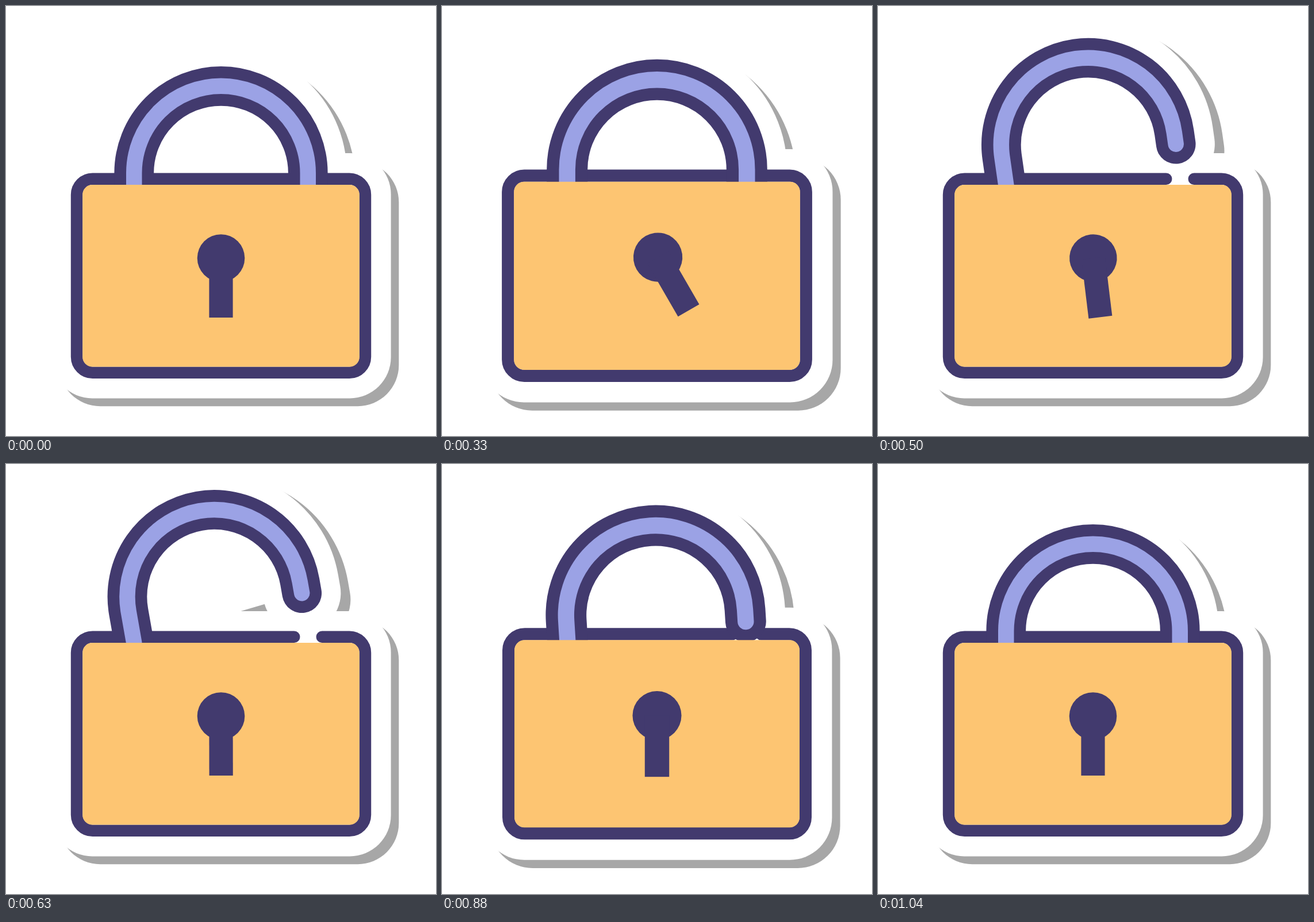
An HTML page for the animation above (1.18 s loop, 748x748 px).

```html
<!DOCTYPE html>
<html lang="en">
<head>
<meta charset="utf-8">
<title>Padlock</title>
<style>
  html, body { margin: 0; width: 100%; height: 100%; overflow: hidden; background: #fff; }
  svg { display: block; width: 100vw; height: 100vh; }
  .line { fill: none; stroke: #423a6e; stroke-linecap: round; }
</style>
</head>
<body>
<svg viewBox="0 0 748 748">
  <defs>
    <path id="bow" d="M222.75 345V290.5a151.25 151.25 0 0 1 302.5 0V311"/>
    <rect id="plate" x="78.4" y="256.1" width="591.2" height="426.3" rx="71.6"/>
  </defs>
  <g id="lock">
    <g class="bow" fill="#a7a7a7" stroke="#a7a7a7" stroke-linecap="round">
      <use href="#bow" x="13.75" y="13.75" stroke-width="137.5"/>
    </g>
    <use href="#plate" x="13.75" y="13.75" fill="#a7a7a7"/>
    <use href="#plate" fill="#fff"/>
    <g class="bow" fill="#fff" stroke="#fff" stroke-linecap="round">
      <use href="#bow" stroke-width="135.3"/>
    </g>
    <path class="line" stroke-width="20.6" d="M549.8 300.8H597.4a27.5 27.5 0 0 1 27.5 27.5V610.2a27.5 27.5 0 0 1-27.5 27.5H150.6a27.5 27.5 0 0 1-27.5-27.5V328.3a27.5 27.5 0 0 1 27.5-27.5H501.2"/>
    <g class="bow">
      <use href="#bow" class="line" stroke-width="68.75"/>
      <use href="#bow" class="line" stroke-width="27.5" style="stroke:#9ba2e5"/>
    </g>
    <rect x="133.2" y="311" width="481.6" height="316.6" rx="17" fill="#fdc572"/>
    <g id="keyhole" fill="#423a6e">
      <circle cx="374" cy="438.5" r="41.3"/>
      <rect x="353.4" y="438.5" width="41.2" height="103.5"/>
    </g>
  </g>
</svg>
<script>
const LOOP = 1180;
const lock = document.getElementById('lock');
const keyhole = document.getElementById('keyhole');
const bows = document.querySelectorAll('.bow');

// Smooth 0..1 ramp from a to b; power > 1 gives a longer tail.
function ramp(t, a, b, power = 1) {
  const x = Math.min(1, Math.max(0, (t - a) / (b - a)));
  const y = 1 - (1 - x) ** power;
  return y * y * (3 - 2 * y);
}

// Tick of a 24 per second clock, with tick starts rounded to 10 ms.
const tickAt = ms => Math.ceil((Math.floor(ms / 10) + 0.5) * 0.24) - 1;

function draw(ms) {
  const t = tickAt(ms);
  const pulse = ramp(t, 3, 8) - ramp(t, 8, 12) + ramp(t, 16, 20) - ramp(t, 20, 25);
  const turn = ramp(t, 3, 8) - ramp(t, 8, 16, 1.68);
  const open = ramp(t, 8, 16, 1.87) - ramp(t, 16, 24.4);

  lock.setAttribute('transform',
    `translate(374 469.25) scale(${1 + pulse / 30}) translate(-374 -469.25)`);
  keyhole.setAttribute('transform', `rotate(${-30 * turn} 374 435.5)`);
  for (const bow of bows) {
    bow.setAttribute('transform',
      `rotate(${-10 * open} 222.75 311) translate(0 ${-34.4 * open})`);
  }
}

const start = performance.now();
function loop() {
  draw((performance.now() - start) % LOOP);
  requestAnimationFrame(loop);
}
loop();
</script>
</body>
</html>
```
